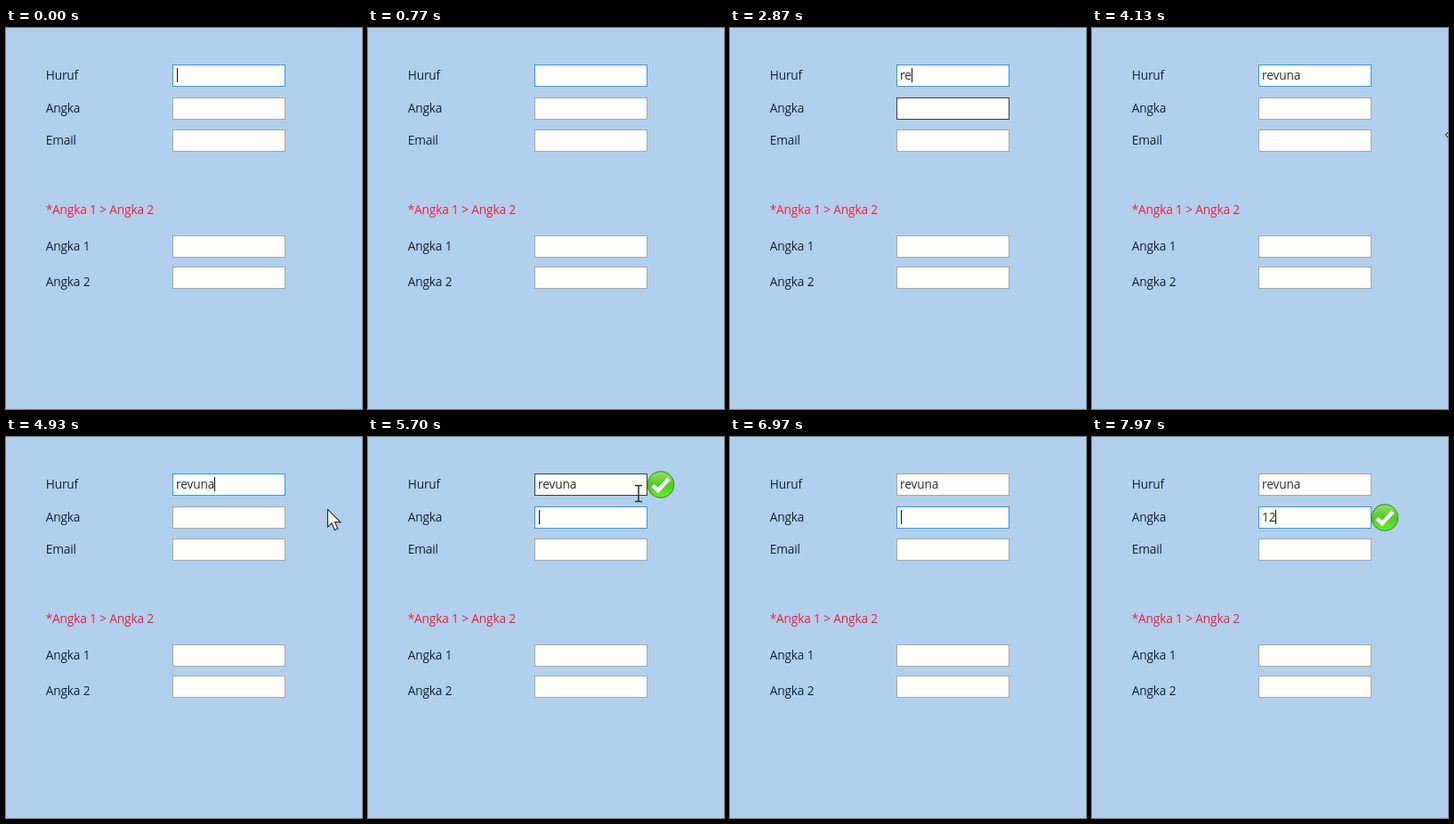
An HTML page with a canvas for the animation above (8 s loop, 400 by 428 pixels).

```html
<!DOCTYPE html>
<html lang="id">
<head>
<meta charset="utf-8">
<title>Validasi form</title>
<style>
  html, body { margin: 0; width: 100%; height: 100%; overflow: hidden; background: #b0d0ee; }
  canvas { display: block; }
</style>
</head>
<body>
<canvas id="stage" width="400" height="428"></canvas>
<script>
const ctx = document.getElementById('stage').getContext('2d');
const LOOP = 8000;
const FIELD = { x: 187, w: 127, h: 25 };
const FIELD_TOPS = [41, 78, 114, 233, 268];
const FORM_EDGE = 404;
const LABELS = [
  ['Huruf', 58], ['Angka', 95], ['Email', 131],
  ['*Angka 1 > Angka 2', 208.5, '#f81c36'],
  ['Angka 1', 250], ['Angka 2', 290]
];

const NAME = 'revuna', NAME_KEYS = [1700, 2750, 2950, 3150, 3300, 3450];
const NUMBER = '12', NUMBER_KEYS = [7400, 7700];
const FOCUS_SWITCH = 5550;
const BLINK = { caret: 530, icon: 250 };

// Each pointer visit: time, x, y. Typing hides the pointer between the first two.
const VISITS = [
  [[1860, 402, 75], [1970, 362, 71], [2200, 300, 90], [2750, 300, 90]],
  [[3650, 300, 90], [4130, 409, 120], [4170, 425, 124]],
  [[4900, 362, 80], [5080, 356, 85], [5350, 290, 92], [5550, 290, 92],
   [5700, 304, 63], [5800, 304, 63], [5980, 372, 60]]
];

const typed = (text, keys, t) => text.slice(0, keys.filter(k => k <= t).length);
const blinkOn = (start, half, t) => t >= start && Math.floor((t - start) / half) % 2 === 0;

function pointerAt(t) {
  const path = VISITS.find(p => t >= p[0][0] && t < p[p.length - 1][0]);
  if (!path) return null;
  const i = path.findIndex(p => p[0] > t);
  const [t0, x0, y0] = path[i - 1], [t1, x1, y1] = path[i];
  const k = (t - t0) / (t1 - t0);
  return { x: x0 + (x1 - x0) * k, y: y0 + (y1 - y0) * k };
}

function fieldUnder(p) {
  if (!p || p.x < FIELD.x || p.x > FIELD.x + FIELD.w) return -1;
  return FIELD_TOPS.findIndex(top => p.y >= top && p.y <= top + FIELD.h);
}

function drawField(top, border) {
  ctx.fillStyle = '#fffefb';
  ctx.fillRect(FIELD.x, top, FIELD.w, FIELD.h);
  ctx.strokeStyle = border;
  ctx.lineWidth = 1;
  ctx.strokeRect(FIELD.x + 0.5, top + 0.5, FIELD.w - 1, FIELD.h - 1);
}

function drawText(text, x, baseline, color = '#16202c') {
  ctx.fillStyle = color;
  ctx.fillText(text, x, baseline);
}

function drawCaret(text, top) {
  const x = text ? 191 + ctx.measureText(text).width : 191.5;
  ctx.fillStyle = '#111';
  ctx.fillRect(Math.round(x), top + 4, 1, 16);
}

function drawCheck(cy) {
  const cx = 329;
  const green = ctx.createLinearGradient(0, cy - 15, 0, cy + 15);
  green.addColorStop(0, '#9be06c');
  green.addColorStop(0.5, '#50cc22');
  green.addColorStop(1, '#66f02c');
  ctx.beginPath();
  ctx.arc(cx, cy, 14.7, 0, 2 * Math.PI);
  ctx.fillStyle = green;
  ctx.fill();
  ctx.strokeStyle = '#3fa030';
  ctx.lineWidth = 1.2;
  ctx.stroke();
  ctx.beginPath();
  ctx.moveTo(cx - 9, cy + 1);
  ctx.lineTo(cx - 3, cy + 6.5);
  ctx.lineTo(cx + 9, cy - 6.5);
  ctx.strokeStyle = '#fff';
  ctx.lineWidth = 4.5;
  ctx.stroke();
}

const POINTERS = {
  arrow: new Path2D('M.5 .5V20L5 16L8.3 23.5L11.8 22L8.6 14.8H14.8Z'),
  ibeam: new Path2D('M-4 -8.5H-1L0 -7.5L1 -8.5H4M0 -7.5V8.5M-4 9.5H-1L0 8.5L1 9.5H4'),
  resize: new Path2D('M-12 0L-7 -5V-1.5H7V-5L12 0L7 5V1.5H-7V5Z')
};

function drawPointer(p, overField) {
  const kind = overField ? 'ibeam' : p.x > FORM_EDGE ? 'resize' : 'arrow';
  ctx.save();
  ctx.translate(p.x, p.y);
  ctx.strokeStyle = '#2c2f36';
  ctx.lineWidth = overField ? 1.5 : 1.2;
  if (!overField) {
    ctx.fillStyle = '#fffefb';
    ctx.fill(POINTERS[kind]);
  }
  ctx.stroke(POINTERS[kind]);
  ctx.restore();
}

function draw(t) {
  ctx.fillStyle = '#b0d0ee';
  ctx.fillRect(0, 0, 400, 428);
  ctx.font = '13.7px "Open Sans", "Noto Sans", sans-serif';
  ctx.letterSpacing = '-0.15px';

  const pointer = pointerAt(t);
  // A pointer hidden by typing still hovers over its field.
  const hidden = t >= 2750 && t < 3650;
  const hovered = hidden ? 1 : fieldUnder(pointer);
  const focused = t < FOCUS_SWITCH ? 0 : 1;
  const values = [typed(NAME, NAME_KEYS, t), typed(NUMBER, NUMBER_KEYS, t)];

  LABELS.forEach(([text, y, color]) => drawText(text, 44.7, y, color));
  FIELD_TOPS.forEach((top, i) =>
    drawField(top, i === focused ? '#3399e4' : i === hovered ? '#3e3e40' : '#aaa69e'));
  values.forEach((text, i) => drawText(text, 191, FIELD_TOPS[i] + 17, '#2c2c2a'));

  const resets = [-200, ...NAME_KEYS, FOCUS_SWITCH, ...NUMBER_KEYS];
  const lastReset = resets.filter(r => r <= t).pop();
  if (blinkOn(lastReset, BLINK.caret, t)) drawCaret(values[focused], FIELD_TOPS[focused]);

  if (blinkOn(FOCUS_SWITCH, BLINK.icon, t)) drawCheck(53.5);
  if (blinkOn(NUMBER_KEYS[0], BLINK.icon, t)) drawCheck(90.5);
  if (pointer) drawPointer(pointer, hovered >= 0);
}

const start = performance.now();
function tick() {
  draw((performance.now() - start) % LOOP);
  requestAnimationFrame(tick);
}
tick();
</script>
</body>
</html>
```
